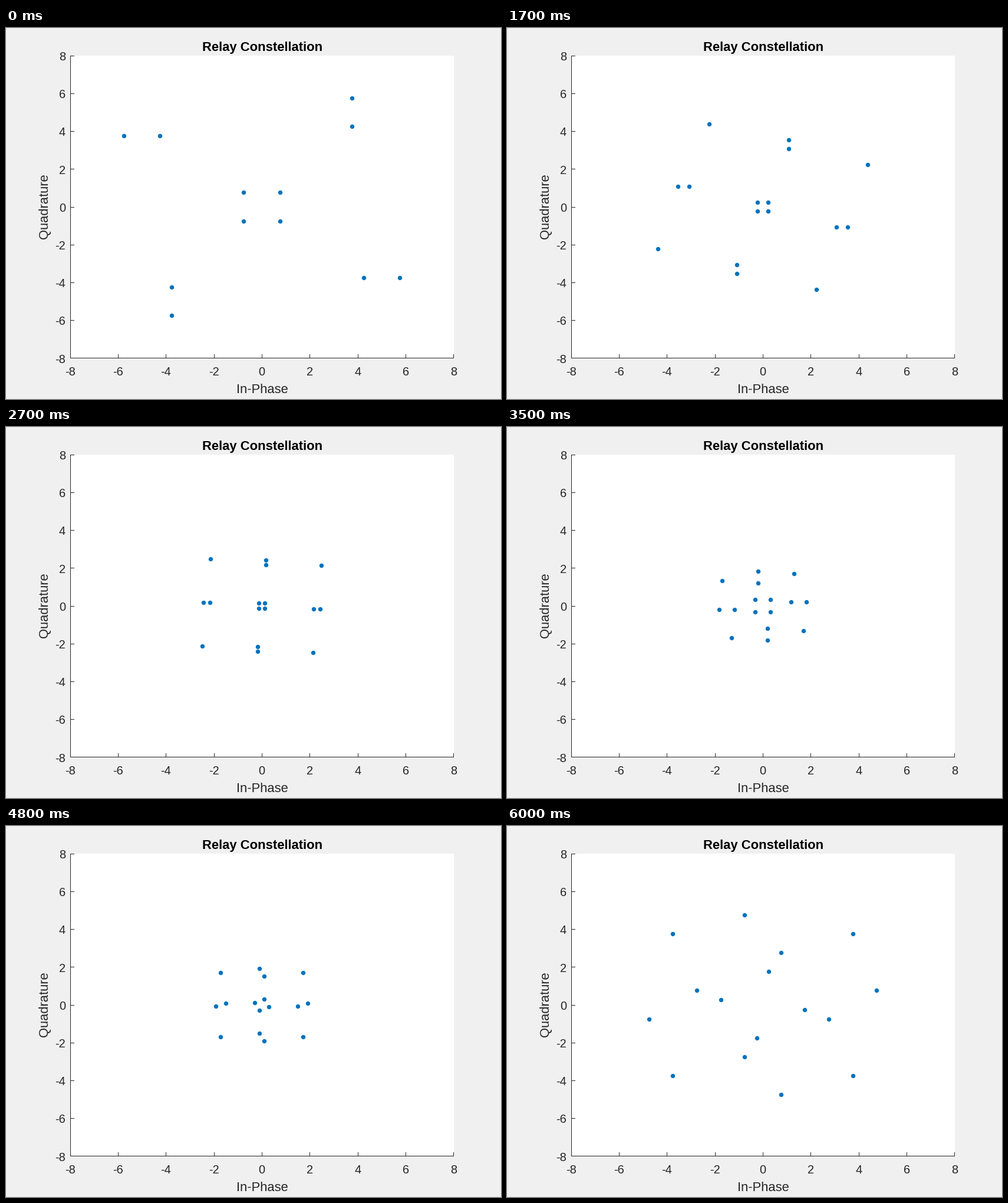
These frames come from a looping animation (840 by 630 pixels, 6.1 s). A matplotlib script:

```python
import numpy as np
import matplotlib.pyplot as plt
from matplotlib.animation import FuncAnimation
from matplotlib.patches import Circle, Rectangle

W, H, DPI = 840, 630, 100
FRAMES, INTERVAL = 61, 100
CX, CY = 434.5, 304.0            # pixel position of the plot's origin
SX, SY = 40.6875, 32.09          # pixels per unit
LEFT, RIGHT, TOP, BOTTOM = 109, 760, 47, 561
INK, BLUE, GREY = "#262626", "#0072BD", "#F0F0F0"
TICK_SIZE, LABEL_SIZE = 20, 22
DIGIT, MINUS = 0.556 * TICK_SIZE, 0.333 * TICK_SIZE   # advance widths

plt.rcParams["font.family"] = "Liberation Sans"


def pt(px):
    return px * 72 / DPI


def to_px(x, y):
    return CX + SX * x, CY - SY * y


def snap(v):
    """Centre of the pixel that holds v."""
    return np.floor(v) + 0.5


fig = plt.figure(figsize=(W / DPI, H / DPI), dpi=DPI, facecolor=GREY)
ax = fig.add_axes([0, 0, 1, 1])
ax.set_xlim(0, W)
ax.set_ylim(H, 0)
ax.axis("off")

panel = Rectangle((LEFT, TOP), RIGHT - LEFT, BOTTOM - TOP, fc="white", lw=0)
ax.add_patch(panel)


def line(xs, ys):
    ax.plot(xs, ys, color=INK, lw=pt(1), solid_capstyle="butt", snap=False)


def label(x, y, text, size=LABEL_SIZE, color=INK, **kw):
    kw = {"ha": "center", "va": "baseline", **kw}
    ax.text(x, y, text, fontsize=pt(size), color=color, **kw)


axis_x, axis_y = LEFT + 0.5, BOTTOM - 0.5
line([axis_x, axis_x], [TOP, BOTTOM])
line([LEFT, RIGHT], [axis_y, axis_y])

for v in range(-8, 9, 2):
    px, py = to_px(v, v)
    tick_x, tick_y = min(snap(px), RIGHT - 0.5), min(snap(py), axis_y)
    line([tick_x, tick_x], [BOTTOM - 7, BOTTOM])
    line([LEFT, LEFT + 7], [tick_y, tick_y])
    width = DIGIT + MINUS * (v < 0)
    label(np.floor(px - width / 2), 590, str(v), TICK_SIZE, ha="left")
    label(np.floor(101.2 - width), py + 7.8, str(v), TICK_SIZE, ha="left")

label(CX + 0.8, 39, "Relay Constellation", color="black", weight="bold")
label(CX, 620, "In-Phase")
label(71, CY - 1, "Quadrature", rotation=90, rotation_mode="anchor")

dots = [ax.add_patch(Circle((0, 0), 3.7, fc=BLUE, lw=0)) for _ in range(16)]
for dot in dots:
    dot.set_clip_path(panel)

TURNS = np.array([1, 1j, -1, -1j])


def constellation(t):
    """Sums of two four-phase signals sent over two changing channels."""
    a = 4 - t + 1j
    b = a + 0.25 * (t - 1) * (t - 3) * (1 - 1j)
    return np.add.outer(a * TURNS, b * TURNS).ravel()


def draw(frame):
    p = constellation(frame / 10)
    x, y = to_px(p.real, p.imag)
    for dot, center in zip(dots, zip(snap(x), snap(y))):
        dot.set_center(center)
    return dots


anim = FuncAnimation(fig, draw, frames=FRAMES, interval=INTERVAL,
                     repeat=True, repeat_delay=0)
plt.show()
```
